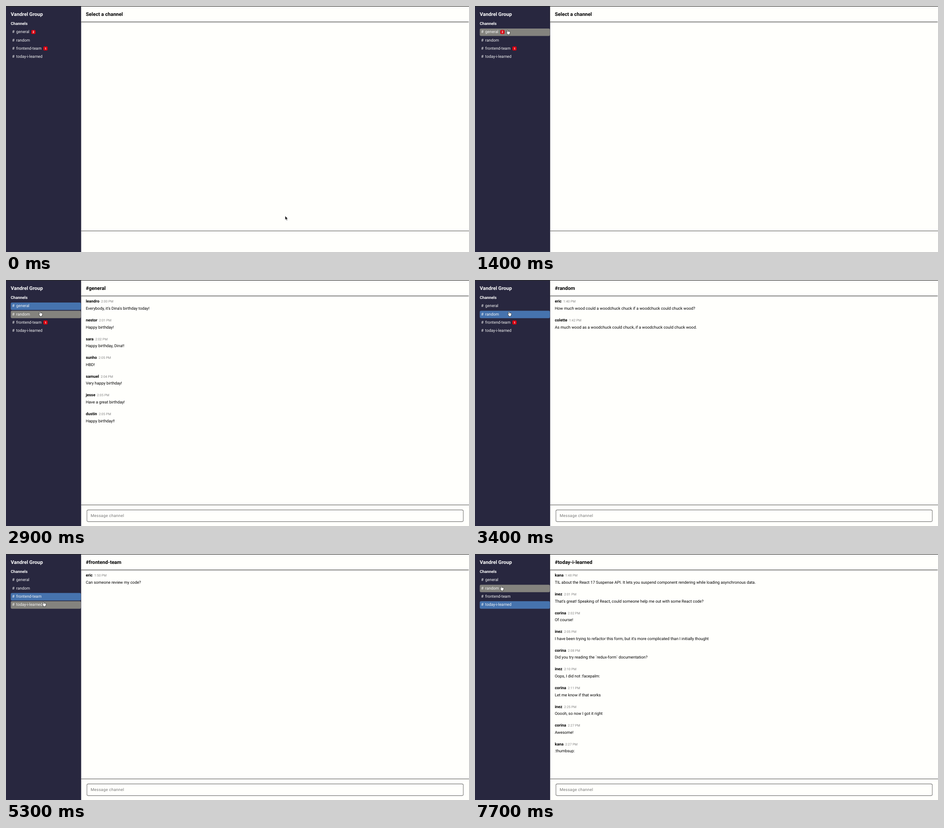
These frames come from a looping animation (1025 by 546 pixels, 8 s). An HTML page:

```html
<!DOCTYPE html>
<html lang="en">
<head>
<meta charset="utf-8">
<title>Team chat</title>
<style>
  html, body { margin: 0; width: 100%; height: 100%; overflow: hidden; background: #fffffc; }
  #app {
    position: absolute; width: 1848px; height: 985px; overflow: hidden;
    transform: scale(.5547); transform-origin: 0 0;
    font: 16px/26px Roboto, sans-serif; color: #000; background: #fffffc;
    text-rendering: geometricPrecision; white-space: nowrap;
  }
  #app * { box-sizing: border-box; }
  .abs, .row, .row > *, #app svg { position: absolute; }
  #side { left: 0; top: 0; width: 300px; height: 985px; background: #28273f; color: #fff; }
  #side b { left: 19px; }
  #topline { left: 0; top: 0; width: 100%; height: 2px; background: #262626; }
  .row { left: 19px; width: 280px; height: 30px; line-height: 28px; border-radius: 5px; color: #f4f4f4; }
  .row.hover { background: #84837e; }
  .row.on { background: #4673ae; }
  .row i { left: 5.5px; font-style: normal; }
  .row span { left: 21.7px; }
  .row em {
    display: inline-block; width: 17px; height: 16px; margin-left: 7.5px; border-radius: 4px;
    background: #d8000f; color: #fff; font: bold 12px/16px Roboto, sans-serif;
    text-align: center; vertical-align: 1px;
  }
  #head {
    left: 300px; top: 0; width: 1548px; height: 62px; padding-left: 18.5px;
    background: #fffffc; box-shadow: 0 2px 4px rgba(0, 0, 0, .65);
    font-size: 20px; font-weight: bold; line-height: 64px;
  }
  .list { left: 318.5px; top: 72.5px; }
  .list p { margin: 0; height: 75px; }
  .list small { margin-left: 7px; font-size: 13.33px; color: #858585; }
  #foot { left: 300px; top: 899px; width: 1548px; height: 2px; background: #585858; }
  #box {
    left: 322px; top: 919px; width: 1504px; height: 49px; padding-left: 14px;
    border: 2px solid #767676; border-radius: 6px; line-height: 45px;
    letter-spacing: .55px; color: #757575;
  }
  #app svg { left: 0; top: 0; overflow: visible; }
</style>
</head>
<body>
<div id="app">
  <div id="side" class="abs">
    <b class="abs" style="top:20px;font-size:20px">Vandrel Group</b>
    <b class="abs" style="top:58px">Channels</b>
  </div>
  <div id="head" class="abs"></div>
  <div id="foot" class="abs"></div>
  <div id="box" class="abs">Message channel</div>
  <div id="topline" class="abs"></div>
  <svg id="arrow" width="12" height="19"><path d="M0 0V15.5L3.6 12.2L6.2 18.2L8.9 17L6.3 11.2H11Z" fill="#111" stroke="#fff"/></svg>
  <svg id="hand" width="16" height="18"><path transform="scale(1.1) translate(-5)" stroke="#222" stroke-width="1.2" fill="#fff"
    d="M5 .6C4 .6 3.5 1.3 3.5 2.2V9L2 7.8C.9 7 -.1 8 .6 9L4.2 14.5V17.4H12.7V14.5L14.3 11V6.8C14.3 5.3 12.3 5.3 12.1 6.6C12.1 5 9.9 4.8 9.7 6.2C9.7 4.6 7 4.6 6.9 6V2.2C6.9 1.2 6.1 .6 5 .6Z"/></svg>
</div>
<script>
const LOOP = 8000, SCALE = .5547;
const GENERAL = 0, RANDOM = 1, FRONTEND = 2, TODAY = 3, NONE = -1;
const $ = id => document.getElementById(id);

// messages: [user, time, text]
const channels = [
  { name: 'general', unread: 2, messages: [
    ['leandro', '2:00', "Everybody, it's Dina's birthday today!"],
    ['nestor', '2:01', 'Happy birthday!'],
    ['sara', '2:02', 'Happy birthday, Dina!!'],
    ['sunho', '2:05', 'HBD!'],
    ['samuel', '2:04', 'Very happy birthday!'],
    ['jesse', '2:05', 'Have a great birthday!'],
    ['dustin', '2:05', 'Happy birthday!!']] },
  { name: 'random', messages: [
    ['eric', '1:40', 'How much wood could a woodchuck chuck if a woodchuck could chuck wood?'],
    ['colette', '1:42', 'As much wood as a woodchuck could chuck, if a woodchuck could chuck wood.']] },
  { name: 'frontend-team', unread: 1, messages: [
    ['eric', '1:50', 'Can someone review my code?']] },
  { name: 'today-i-learned', messages: [
    ['kana', '1:48', 'TIL about the React 17 Suspense API. It lets you suspend component rendering while loading asynchronous data.'],
    ['inez', '2:01', "That's great! Speaking of React, could someone help me out with some React code?"],
    ['corina', '2:02', 'Of course!'],
    ['inez', '2:05', "I have been trying to refactor this form, but it's more complicated than I initially thought"],
    ['corina', '2:08', 'Did you try reading the `redux-form` documentation?'],
    ['inez', '2:10', 'Oops, I did not :facepalm:'],
    ['corina', '2:11', 'Let me know if that works'],
    ['inez', '2:25', 'Ooooh, so now I got it right'],
    ['corina', '2:27', 'Awesome!'],
    ['kana', '2:27', ':thumbsup:']] }
];

// [time, selected channel, channel whose messages are loaded]
const views = [
  [0, NONE, NONE], [2100, GENERAL, NONE], [2200, GENERAL, GENERAL],
  [3200, RANDOM, GENERAL], [3400, RANDOM, RANDOM],
  [4900, FRONTEND, RANDOM], [5000, FRONTEND, FRONTEND], [6200, TODAY, TODAY]
];

// [time, x, y, hovered row]
const moves = [
  [900, 66, 57, NONE], [1200, 69, 42, GENERAL], [1400, 72, 53, GENERAL],
  [2500, 73, 57, GENERAL], [2600, 74, 64, GENERAL], [2700, 74.5, 69.5, RANDOM], [2900, 75, 70, RANDOM],
  [3600, 75.5, 77, RANDOM], [3700, 76, 90, FRONTEND], [3800, 77, 100, FRONTEND], [3900, 78, 110, TODAY],
  [4200, 78.5, 107, TODAY], [4300, 79, 103.5, NONE], [4600, 79, 103, FRONTEND], [4700, 79, 98, FRONTEND],
  [5200, 80, 102, FRONTEND], [5300, 83, 106, TODAY], [5400, 85, 108, TODAY],
  [7000, 77, 101, FRONTEND], [7100, 70, 92, FRONTEND],
  [7500, 65, 86, FRONTEND], [7600, 60, 76, RANDOM], [7700, 58, 71, RANDOM]
];

const latest = (steps, t) => steps.filter(s => s[0] <= t).pop();

function add(parent, className, html) {
  const el = document.createElement('div');
  el.className = className;
  el.innerHTML = html;
  return parent.appendChild(el);
}

channels.forEach((c, i) => {
  const badge = c.unread ? `<em>${c.unread}</em>` : '';
  c.row = add($('side'), 'row', `<i>#</i><span>${c.name}${badge}</span>`);
  c.row.style.top = 90 + 33 * i + 'px';
  c.badge = c.row.querySelector('em');
  c.list = add($('app'), 'list abs', c.messages.map(([user, time, text]) =>
    `<p><b>${user}</b><small>${time} PM</small><br>${text}</p>`).join(''));
  c.readAt = views.find(v => v[1] === i)[0];
});
$('app').append($('arrow'), $('hand'));

function pointer(t) {
  if (t >= 900) return latest(moves, t);
  const p = Math.max(0, (t - 200) / 700);
  const ease = p * p * (3 - 2 * p);
  return [t, 618 + (66 - 618) * ease, 466 + (57 - 466) * ease, NONE];
}

function render(t) {
  const [, selected, loaded] = latest(views, t);
  const [, x, y, hovered] = pointer(t);
  channels.forEach((c, i) => {
    c.row.className = 'row' + (i === selected ? ' on' : i === hovered ? ' hover' : '');
    c.list.style.display = i === loaded ? '' : 'none';
    if (c.badge) c.badge.style.display = t < c.readAt ? '' : 'none';
  });
  $('head').textContent = selected === NONE ? 'Select a channel' : '#' + channels[selected].name;
  $('box').style.display = selected === NONE ? 'none' : '';
  const isHand = t >= 1200;
  $('arrow').style.display = isHand ? 'none' : '';
  $('hand').style.display = isHand ? '' : 'none';
  $(isHand ? 'hand' : 'arrow').style.transform = `translate(${x / SCALE}px, ${y / SCALE}px)`;
}

// The screen updates ten times a second.
function tick() {
  render(Math.floor(performance.now() % LOOP / 100) * 100);
  requestAnimationFrame(tick);
}
tick();
</script>
</body>
</html>
```
